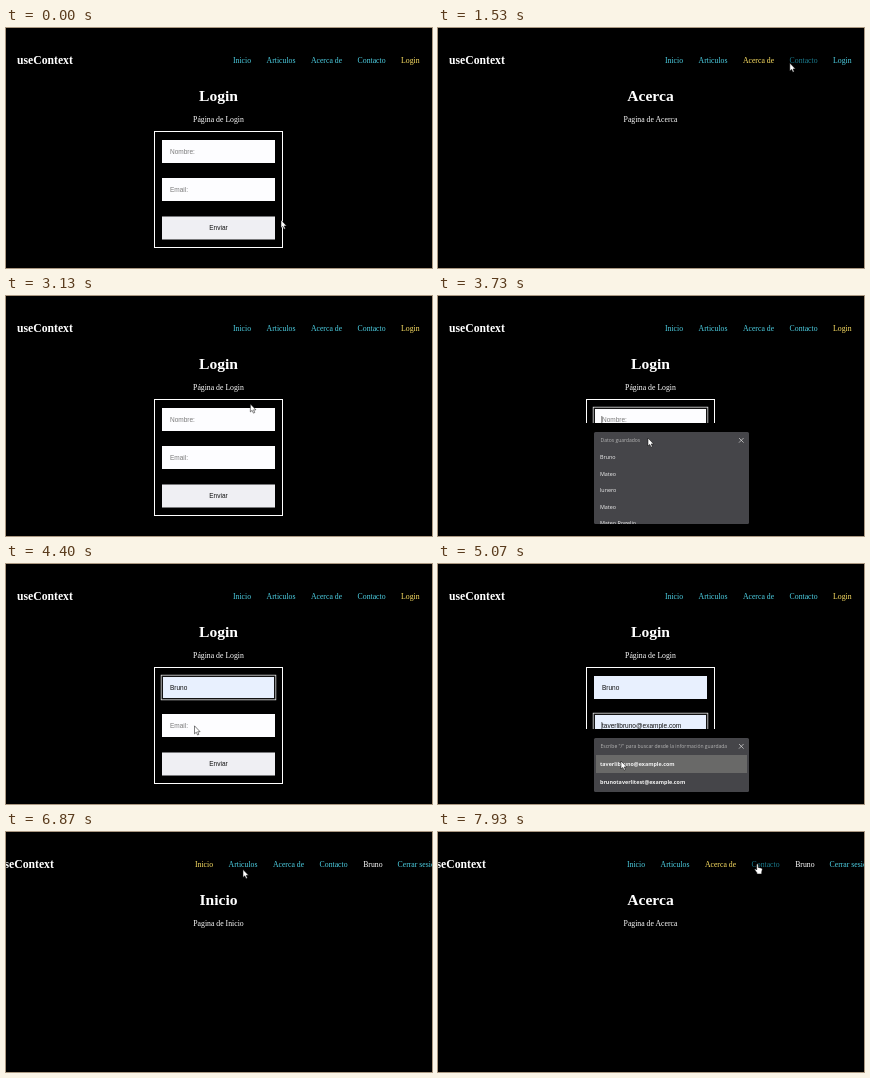
Animation of 426x240 px, one loop 8 s. Source, as an HTML page:

```html
<!DOCTYPE html>
<html lang="es">
<head>
<meta charset="utf-8">
<title>useContext</title>
<style>
  html, body { margin: 0; width: 100%; height: 100%; overflow: hidden; background: #000; }
  svg { display: block; width: 100vw; height: 100vh; }
  text { font-family: "Liberation Serif", "Times New Roman", serif; font-size: 7.75px; fill: #fff; white-space: pre; }
  .logo { font-size: 11.7px; font-weight: bold; }
  .title { font-size: 15.6px; font-weight: bold; text-anchor: middle; }
  .mid { text-anchor: middle; }
  .field { font-family: "Liberation Sans", Arial, sans-serif; font-size: 6.5px; fill: #111; }
  .menu { font-family: "Open Sans", "Noto Sans", sans-serif; font-size: 5.4px; fill: #f2f2f2; }
  .menu.head { font-size: 5px; fill: #b4b4b4; }
  .menu.bold { font-weight: 700; }
</style>
</head>
<body>
<svg id="stage" viewBox="0 0 426 240" xmlns="http://www.w3.org/2000/svg"></svg>
<script>
const LOOP = 8000, STEP = 1000 / 15;
const USER = "Bruno", MAIL = "taverlibruno@example.com";
const CYAN = "#4dd0e4", DIM = "#1a7a8c", YELLOW = "#ffe264";
const stage = document.getElementById("stage");

function add(parent, tag, attrs, text) {
  const el = document.createElementNS(stage.namespaceURI, tag);
  for (const k in attrs) el.setAttribute(k, attrs[k]);
  if (text) el.textContent = text;
  parent.appendChild(el);
  return el;
}
const group = parent => add(parent, "g", {});
const rect = (p, x, y, width, height, fill, more) => add(p, "rect", { x, y, width, height, fill, ...more });
const label = (p, x, y, cls, text) => add(p, "text", { x, y, class: cls }, text);
const show = (el, on) => el.style.display = on ? "" : "none";

// Header
const logo = label(stage, 11, 36, "logo", "useContext");
const NAV = [["Inicio", 227, 18], ["Articulos", 260.6, 29], ["Acerca de", 304.9, 31], ["Contacto", 351.6, 28], ["Login", 395.1, 19]];
const links = NAV.map(([name, x]) => label(stage, x, 35, "", name));
const account = group(stage);
label(account, 357.2, 35, "", USER);
const logout = label(account, 391.6, 35, "", "Cerrar sesión");
logout.style.fill = CYAN;

const title = label(stage, 212.5, 73, "title", "");
const intro = label(stage, 212.5, 94, "mid", "");
const PAGES = [
  ["Inicio", "Pagina de Inicio"], ["Articulos", "Pagina de Articulos"], ["Acerca", "Pagina de Acerca"],
  ["Contacto", "Pagina de Contacto"], ["Login", "Página de Login"]
];

// Form
const form = group(stage);
rect(form, 148.5, 103.5, 128, 116, "none", { stroke: "#fff" });
function makeInput(y, hint) {
  const ring = group(form);
  rect(ring, 154.8, y - 1.2, 115.4, 25.4, "#fff");
  rect(ring, 155.5, y - 0.5, 114, 24, "#111");
  const box = rect(form, 156, y, 113, 23, "#fff");
  const text = label(form, 164, y + 13.8, "field", hint);
  const caret = rect(form, 163.6, y + 8, 0.6, 7.5, "#111");
  return (value, focus, typing) => {
    show(ring, focus);
    show(caret, typing);
    const inset = focus ? 1 : 0;
    for (const [k, v] of Object.entries({ x: 156 + inset, y: y + inset, width: 113 - 2 * inset, height: 23 - 2 * inset }))
      box.setAttribute(k, v);
    box.setAttribute("fill", value ? "#e8f0fe" : "#fdfdff");
    text.textContent = value || hint;
    text.style.fill = value ? "#111" : "#7a7a7a";
  };
}
const setName = makeInput(112, "Nombre:");
const setMail = makeInput(150, "Email:");
const button = rect(form, 156, 188.5, 113, 23, "#efeff3");
label(form, 212.5, 202.3, "field mid", "Enviar");

// Suggestion menus
function makeMenu(top, head, items, first, pitch, bold) {
  const g = group(stage);
  rect(g, 0, top - 9, 426, 249 - top, "#000");
  rect(g, 156, top, 155, 228 - top, "#454549", { rx: 1.5 });
  const row = rect(g, 158, first - pitch / 2, 151, pitch, "#696968");
  label(g, 162.5, top + 10, "menu head", head);
  add(g, "path", { d: `M301 ${top + 6}l4.6 4.6m0 -4.6l-4.6 4.6`, stroke: "#ddd", "stroke-width": 0.7 });
  items.forEach((s, i) => label(g, 162, first + 2 + i * pitch, "menu" + (bold ? " bold" : ""), s));
  rect(g, 150, 228, 170, 12, "#000");
  return (on, lit) => { show(g, on); show(row, lit); };
}
const nameMenu = makeMenu(136, "Datos guardados",
  [USER, "Mateo", "lunero", "Mateo", "Mateo Rogelio"], 161, 16.5, false);
const mailMenu = makeMenu(174, 'Escribe "/" para buscar desde la información guardada',
  [MAIL, "brunotaverlitest@example.com"], 200, 18, true);

// Pointers, tip at 0,0
const cursor = group(stage);
const ink = { fill: "#fff", stroke: "#000", "stroke-width": 0.5, "stroke-linejoin": "round" };
const arrow = add(cursor, "path", { d: "M0 0V8L1.8 6.4L3.1 9.2L4.4 8.6L3.2 5.9H5.6Z", ...ink });
const hand = add(cursor, "path", {
  d: "M-0.8 0.6Q0 -0.5 0.8 0.6V3.4L4 4.2Q4.9 4.5 4.8 5.4L4.2 8V10H-0.6V8.7L-3 5.6Q-2.6 4.5 -1.6 5.2L-0.8 6Z", ...ink
});

// [time, x, y]
const PATH = [
  [0, 275, 192], [340, 275, 192], [800, 238, 33], [900, 240, 33], [1070, 276, 33], [1130, 276, 33],
  [1270, 318, 33], [1340, 320, 33], [1530, 351.8, 35], [1730, 365, 33], [2000, 368, 33],
  [2400, 404, 37.5], [2530, 404, 33], [2730, 404, 34], [3270, 214, 122], [3530, 212, 124],
  [3730, 210, 142], [4000, 182, 161], [4200, 181, 161], [4470, 190, 162], [4600, 190, 163],
  [4870, 184, 195], [5070, 183, 197], [5330, 183, 198], [5800, 235, 203], [5930, 236, 205],
  [6270, 236, 205], [6930, 237, 33], [7130, 239, 33], [7400, 281, 33], [7600, 284, 33],
  [7870, 317, 32.5], [7930, 319.5, 32], [8000, 320, 32]
];
// [time, page index]
const VISITS = [[0, 4], [860, 0], [1130, 1], [1330, 2], [1930, 3], [2600, 4], [6130, 0], [7060, 1], [7530, 2]];
const LOGIN = 6130;

function pointAt(t) {
  let i = 1;
  while (i < PATH.length - 1 && PATH[i][0] < t) i++;
  const [t0, x0, y0] = PATH[i - 1], [t1, x1, y1] = PATH[i];
  const u = Math.min(1, Math.max(0, (t - t0) / (t1 - t0)));
  const e = u * u * (3 - 2 * u);
  return [x0 + (x1 - x0) * e, y0 + (y1 - y0) * e];
}

function draw(t) {
  const within = (a, b) => t >= a && t < b;
  const [x, y] = pointAt(t);
  const page = VISITS.filter(v => v[0] <= t).pop()[1];
  const logged = t >= LOGIN, shift = logged ? -38 : 0;

  title.textContent = PAGES[page][0];
  intro.textContent = PAGES[page][1];
  logo.setAttribute("x", logged ? -8 : 11);
  show(account, logged);

  let onLink = false;
  links.forEach((el, i) => {
    const left = NAV[i][1] + shift, right = left + NAV[i][2];
    const over = x >= left - 1 && x <= right && y > 27 && y < 36.5;
    onLink = onLink || (over && x > left + 2);
    el.setAttribute("x", left);
    el.style.fill = i === page ? YELLOW : over ? DIM : CYAN;
  });
  show(links[4], !logged);

  show(form, page === 4);
  const nameOpen = within(3460, 4190), mailOpen = within(4530, 5260);
  const nameLit = nameOpen && y > 152, mailLit = mailOpen && y > 190;
  const named = within(4190, LOGIN) || nameLit;
  const mailed = within(5260, LOGIN) || mailLit;
  setName(named ? USER : "", within(3460, 4530), nameOpen);
  setMail(mailed ? MAIL : "", within(4530, LOGIN), mailOpen);
  button.setAttribute("fill", page === 4 && x > 156 && x < 269 && y > 188 && y < 212 ? "#e7e7e7" : "#efeff3");
  nameMenu(nameOpen, nameLit);
  mailMenu(mailOpen, mailLit);

  cursor.setAttribute("transform", `translate(${x.toFixed(2)} ${y.toFixed(2)})`);
  show(hand, onLink);
  show(arrow, !onLink);
}

function frame() {
  const t = performance.now() % LOOP;
  draw(Math.floor((t + 4) / STEP) * STEP % LOOP);
  requestAnimationFrame(frame);
}
frame();
</script>
</body>
</html>
```
